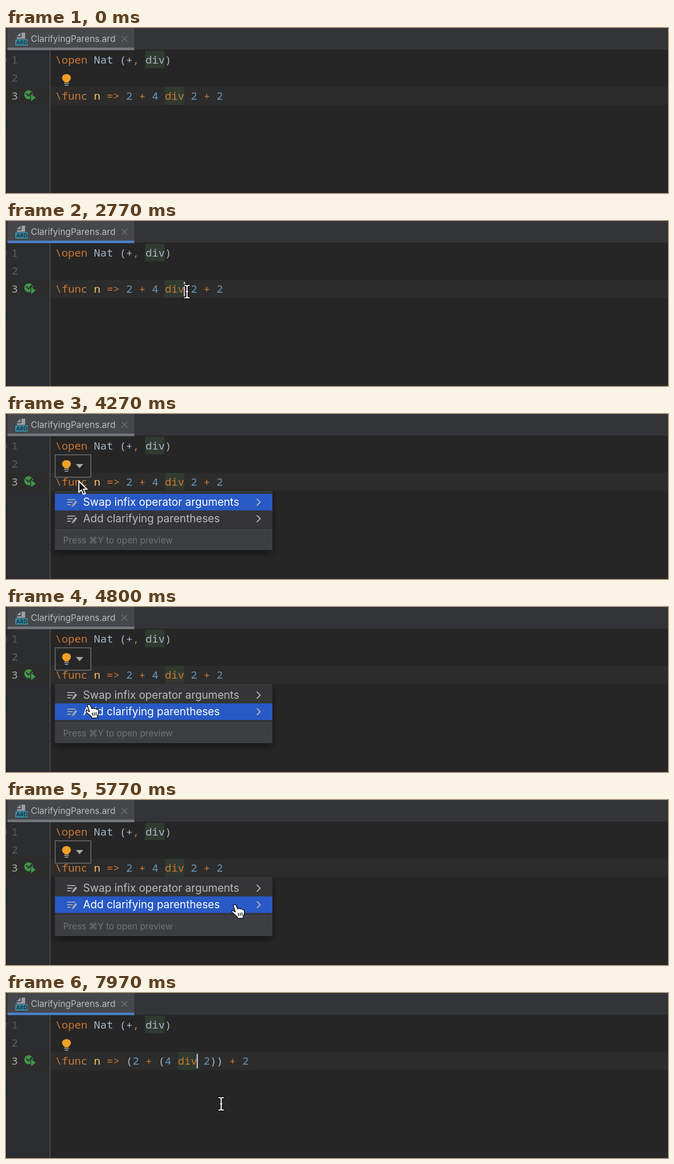
Animation of 1280x320 px, one loop 8 s. Source, as an HTML page:

```html
<!DOCTYPE html>
<html lang="en">
<head>
<meta charset="utf-8">
<title>Clarifying parentheses</title>
<style>
  html, body { margin: 0; width: 100%; height: 100%; overflow: hidden; background: #262626; }
  svg { display: block; width: 1280px; height: 320px; }
  text { white-space: pre; font-family: Inter, sans-serif; }
  .code text { font: 20.8px "Noto Sans Mono", monospace; fill: #a9b7c6; }
  .code .k { fill: #cc7832; }
  .code .d { fill: #6897bb; }
  .code .f { fill: #ffc66d; font-weight: 500; }
  .code .ln { fill: #5c5f62; }
  .code .cur { fill: #a9abad; }
  .small { font-size: 17px; }
  .item { font-size: 20.8px; fill: #bbbcbe; }
  .line { fill: none; stroke-linecap: round; stroke-linejoin: round; }
</style>
</head>
<body>
<svg viewBox="0 0 1280 320">
  <defs>
    <path id="ibeam" d="M-4.500-12H-3Q0-12 0-9.500V9.500Q0 12-3 12H-4.500M4.500-12H3Q0-12 0-9.500M4.500 12H3Q0 12 0 9.500M-1.500 0H1.500"/>
    <g id="edit" class="line" stroke="#a4a7aa" stroke-width="2">
      <path d="M1-5H15M1 0H10M1 5H7"/>
      <path d="M12 6L18-2" stroke-width="4" stroke-linecap="butt"/>
      <path d="M10 8L12 6"/>
    </g>
    <filter id="shadow" x="-10%" y="-20%" width="120%" height="150%">
      <feDropShadow dx="0" dy="6" stdDeviation="7" flood-opacity=".5"/>
    </filter>
  </defs>

  <!-- Editor -->
  <path fill="#2c2d30" d="M0 42H85V320H0z"/>
  <path fill="#2c2c2c" d="M0 114H1280V149H0z"/>
  <path fill="#242527" d="M0 42H2V320H0z"/>
  <path fill="#0d2140" d="M0 171H2V203H0z"/>
  <path class="line" stroke="#6f7174" d="M1 58L0 61.500L1 65"/>
  <path stroke="#555657" stroke-width="1.3" d="M85.300 42V320"/>

  <!-- Tab bar -->
  <path fill="#333438" d="M0 0H1280V42H0z"/>
  <path fill="#46474b" d="M3 0H248V42H3z"/>
  <rect id="underline" x="3" y="38" width="245" height="5"/>
  <path fill="#9aa0a5" d="M30 9H37V21H21V18H30zM21 16L28 9V16z"/>
  <path fill="#3592ad" d="M18 22H42V34H18z"/>
  <text x="19.5" y="31.7" font-size="10.5" font-weight="700" fill="#202b31">ARD</text>
  <text class="small" x="48" y="27" fill="#bbbcbe">ClarifyingParens.ard</text>
  <path class="line" stroke="#6f7174" stroke-width="1.5" d="M224 16L234 26M234 16L224 26"/>

  <!-- Gutter icon -->
  <circle cx="44" cy="129.500" r="8.700" fill="#3f9545"/>
  <path class="line" stroke="#2c2d30" stroke-width="2.400" d="M39.500 127.500L43.500 131.500L50.500 124.500"/>
  <path fill="#3f9545" stroke="#2c2d30" stroke-width="3" paint-order="stroke" d="M48.500 128L57.500 135L48.500 142z"/>

  <g class="code">
    <rect x="269" y="44" width="37.4" height="34" fill="#303a30"/>
    <rect id="usage" y="114" width="37.4" height="35" fill="#303a30"/>
    <text class="ln" x="10.500" y="69">1</text>
    <text class="ln" x="10.500" y="104">2</text>
    <text class="cur" x="10.500" y="139">3</text>
    <text x="95" y="69"><tspan class="k">\open</tspan> Nat (+<tspan class="k">,</tspan> div)</text>
    <text x="95" y="139"><tspan class="k">\func</tspan> <tspan class="f">n</tspan> <tspan class="k">=&gt;</tspan> <tspan id="expr"></tspan></text>
  </g>
  <rect id="caret" y="118" width="2.6" height="28" fill="#c4c4c4"/>

  <!-- Intention bulb -->
  <g id="frame">
    <rect x="95.2" y="79.2" width="68.8" height="43.3" fill="#262626" stroke="#747474" stroke-width="1.5"/>
    <path fill="#a3a5a7" d="M135 97H149.500L142.200 105z"/>
  </g>
  <g id="bulb">
    <path fill="#f2a127" d="M113 105.500V104C105.500 99 108 89.500 117 89.500S128.500 99 121 104V105.500z"/>
    <path stroke="#b4b6b8" stroke-width="1.500" d="M112.500 107.500H121.500M113.500 111H120.500"/>
  </g>

  <!-- Menu -->
  <g id="menu">
    <path fill="#343538" filter="url(#shadow)" d="M94.500 149H515V264H94.500z"/>
    <rect id="selection" x="94.500" width="420.500" height="32" fill="#2859c5"/>
    <path fill="#3c3f41" d="M94.500 225H515V264H94.500z"/>
    <path stroke="#4b4d4f" d="M94.500 224.500H515"/>
    <use href="#edit" x="118" y="171"/>
    <use href="#edit" x="118" y="203"/>
    <text class="item" x="149" y="178">Swap infix operator arguments</text>
    <text class="item" x="149" y="210">Add clarifying parentheses</text>
    <path class="line" stroke="#b4b6b8" stroke-width="2" d="M485.500 165L491.500 171L485.500 177M485.500 197L491.500 203L485.500 209"/>
    <text class="small" x="110.500" y="251" fill="#717375">Press ⌘Y to open preview</text>
  </g>

  <!-- Pointers -->
  <g id="text" class="line">
    <use href="#ibeam" stroke="#0c0c0c" stroke-width="5"/>
    <use href="#ibeam" stroke="#fff" stroke-width="2.200"/>
  </g>
  <path id="arrow" fill="#0c0c0c" stroke="#fff" stroke-width="2" d="M1 1V22.500L6 18L9.500 26.500L13.500 25L10 16.500H16.500z"/>
  <g id="hand" class="line" stroke="#111" stroke-width="1.5">
    <path fill="#fff" d="M-2.500 1C-3-3 2-3 3 0L6 6.500C8 4.500 10 5 11 6.500C13 5 14.500 6 15 7.500C17 6.500 18.500 8 18.500 10C19.500 15 18 18 16.500 20V24L6 24.500L5 21.500C1 19-1 15-5 13C-7 10-3 8.500-.5 11L1.500 12z"/>
    <path d="M7 14.500L8 19.500M10.500 14L11.300 19M14 13.500L14.500 18.500"/>
  </g>
</svg>
<script>
const LOOP = 8000, X0 = 95, ADVANCE = 12.48;
const OPEN = 3930, SELECT = 4730, COMMIT = 6800, CLICK = 2230;
const $ = id => document.getElementById(id);
const show = (id, on) => $(id).setAttribute('visibility', on ? 'visible' : 'hidden');
const column = n => X0 + n * ADVANCE;
const within = (t, a, b) => t >= a && t < b;

// Pointer path: time, x, y of the hot spot
const path = [
  [0, 358, 335], [1000, 358, 335], [1330, 369, 172], [1800, 360, 143], [1870, 360, 143],
  [2200, 350, 137], [3000, 350, 137], [3350, 245, 126], [3730, 136, 100], [3960, 136, 100],
  [4630, 150, 180], [4800, 160, 191], [5400, 402, 213], [5770, 442, 205], [6070, 467, 204],
  [6770, 467, 204], [7200, 438, 262], [7370, 438, 262], [7700, 416, 215], [LOOP, 416, 215]
];
const slope = (i, k) => (path[i + 1][k] - path[i][k]) / (path[i + 1][0] - path[i][0]);

function tangent(i, k) {
  if (i === 0 || i === path.length - 1) return 0;
  const a = slope(i - 1, k), b = slope(i, k);
  return a * b <= 0 ? 0 : 2 * a * b / (a + b);
}

// Monotone cubic interpolation, so the pointer never overshoots
function pointer(t) {
  const i = path.findIndex((p, n) => n < path.length - 1 && t < path[n + 1][0]);
  const span = path[i + 1][0] - path[i][0], u = (t - path[i][0]) / span, v = 1 - u;
  return [1, 2].map(k =>
    path[i][k] * (1 + 2 * u) * v * v + path[i + 1][k] * u * u * (3 - 2 * u) +
    span * u * v * (tangent(i, k) * v - tangent(i + 1, k) * u));
}

const highlight = source => source.replace(/\d|\+|div/g,
  s => `<tspan class="${/\d/.test(s) ? 'd' : 'k'}">${s}</tspan>`);
const before = highlight('2 + 4 div 2 + 2');
const after = highlight('(2 + (4 div 2)) + 2');
const caretOn = [[CLICK, 2330], [2770, 3240], [3715, OPEN], [COMMIT, 7370], [7900, LOOP]];
let shown;

function draw(t) {
  const [x, y] = pointer(t);
  const menu = within(t, OPEN, COMMIT), edited = t >= COMMIT;
  const overBulb = within(t, 3000, OPEN) && x < 164 && y < 124;
  const focused = within(t, CLICK, OPEN) || edited;
  const kind = menu && y > 152 ? 'hand' : menu || overBulb ? 'arrow' : 'text';

  if (shown !== edited) {
    $('expr').innerHTML = edited ? after : before;
    shown = edited;
  }
  $('usage').setAttribute('x', column(edited ? 19 : 17));
  $('caret').setAttribute('x', column(edited ? 22 : 20) - 1);
  $('underline').setAttribute('fill', focused ? '#4a7ec4' : '#73777b');
  $('selection').setAttribute('y', t < SELECT ? 155 : 187);
  document.querySelectorAll('.item').forEach((item, i) =>
    item.style.fill = i === (t < SELECT ? 0 : 1) ? '#fff' : '#bbbcbe');

  show('caret', caretOn.some(([a, b]) => within(t, a, b)));
  show('bulb', t < CLICK || within(t, 3000, COMMIT) || t >= 7900);
  show('frame', menu || overBulb);
  show('menu', menu);
  for (const id of ['text', 'arrow', 'hand']) {
    show(id, id === kind);
    $(id).setAttribute('transform', `translate(${x.toFixed(2)} ${y.toFixed(2)})`);
  }
}

const start = performance.now();
function tick() {
  draw((performance.now() - start) % LOOP);
  requestAnimationFrame(tick);
}
tick();
</script>
</body>
</html>
```
